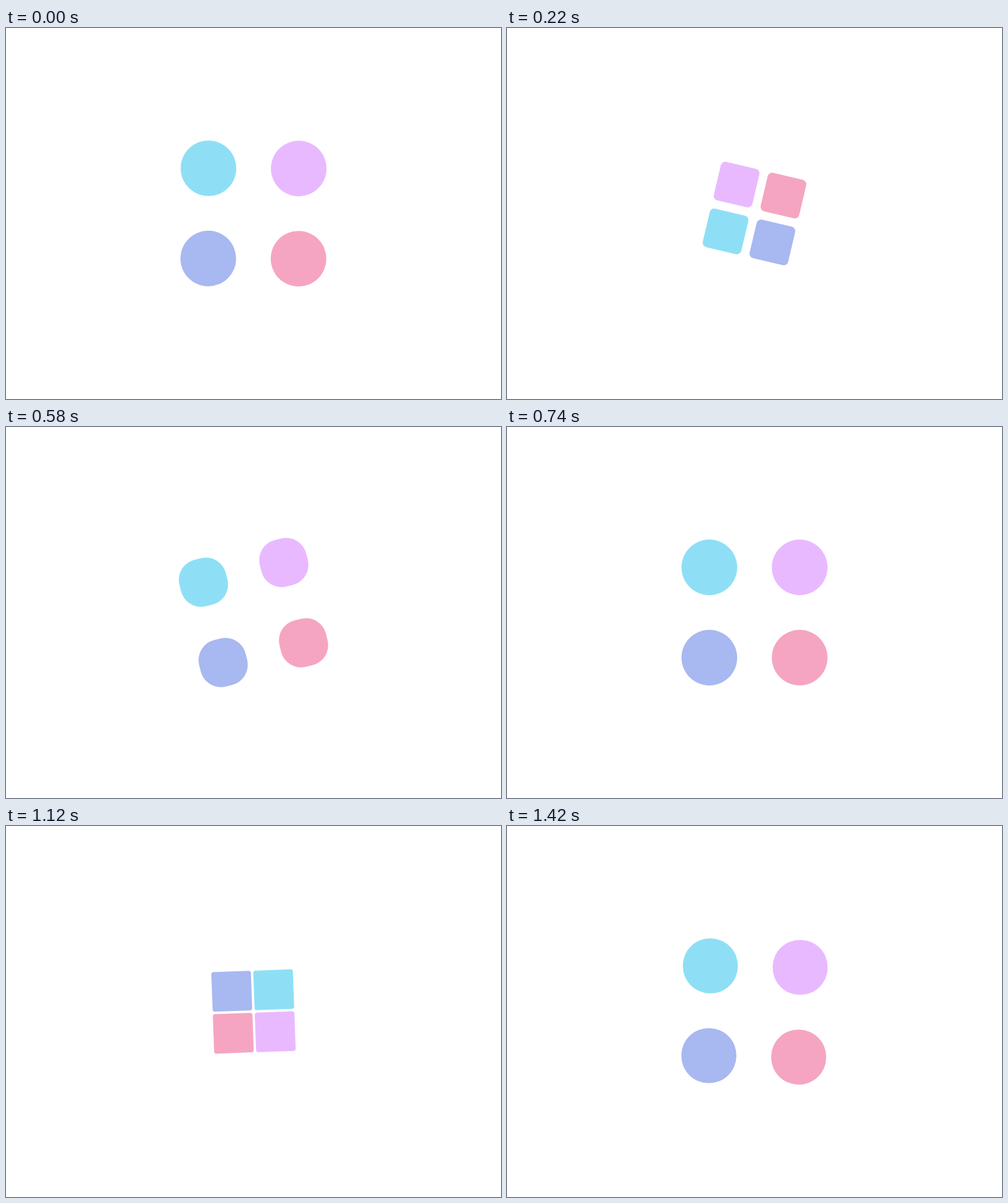
Animation, 800 px wide and 600 px high, one loop 1440 ms. Source, as an HTML page with a canvas:

```html
<!DOCTYPE html>
<html lang="en">
<head>
<meta charset="utf-8">
<title>Four dots</title>
<style>
  html, body { margin: 0; width: 100%; height: 100%; overflow: hidden; background: #fff; }
  canvas { display: block; }
</style>
</head>
<body>
<canvas width="800" height="600"></canvas>
<script>
const ctx = document.querySelector('canvas').getContext('2d');
const LOOP = 1440, STEP = 20;
const SWING = 362.5; // duration of one move: in, out, in, out
const LEAD = 18.5;   // rest before the first move
const DOTS = [
  [-1, -1, '#8edff5'],
  [1, -1, '#e9b9ff'],
  [-1, 1, '#a8b8f0'],
  [1, 1, '#f5a5c1'],
];

// cubic-bezier(.25, .1, .25, 1)
const bezier = (a, b, s) => 3 * a * s * (1 - s) ** 2 + 3 * b * s * s * (1 - s) + s ** 3;

function ease(x) {
  let lo = 0, hi = 1;
  for (let i = 0; i < 24; i++) {
    const mid = (lo + hi) / 2;
    if (bezier(.25, .25, mid) < x) lo = mid; else hi = mid;
  }
  return bezier(.1, 1, lo);
}

function draw(time) {
  const period = 4 * SWING;
  const phase = (time - LEAD + period) % period / SWING;
  const move = Math.floor(phase);
  const eased = ease(phase - move);
  const p = move % 2 ? 1 - eased : eased; // 0 = spread circles, 1 = packed squares
  const turn = (move < 2 ? -1 : 1) * p * Math.PI / 2;
  const reach = 73 - 40 * p;
  const size = 64 + 26 * (1 - p) ** 4;
  const radius = size * (.5 - .45 * p);

  ctx.resetTransform();
  ctx.fillStyle = '#fff';
  ctx.fillRect(0, 0, 800, 600);
  ctx.translate(400, 300);
  ctx.rotate(turn);
  for (const [x, y, color] of DOTS) {
    ctx.fillStyle = color;
    ctx.beginPath();
    ctx.roundRect(x * reach - size / 2, y * reach - size / 2, size, size, radius);
    ctx.fill();
  }
}

function tick() {
  draw(Math.floor(performance.now() % LOOP / STEP) * STEP);
  requestAnimationFrame(tick);
}
tick();
</script>
</body>
</html>
```
